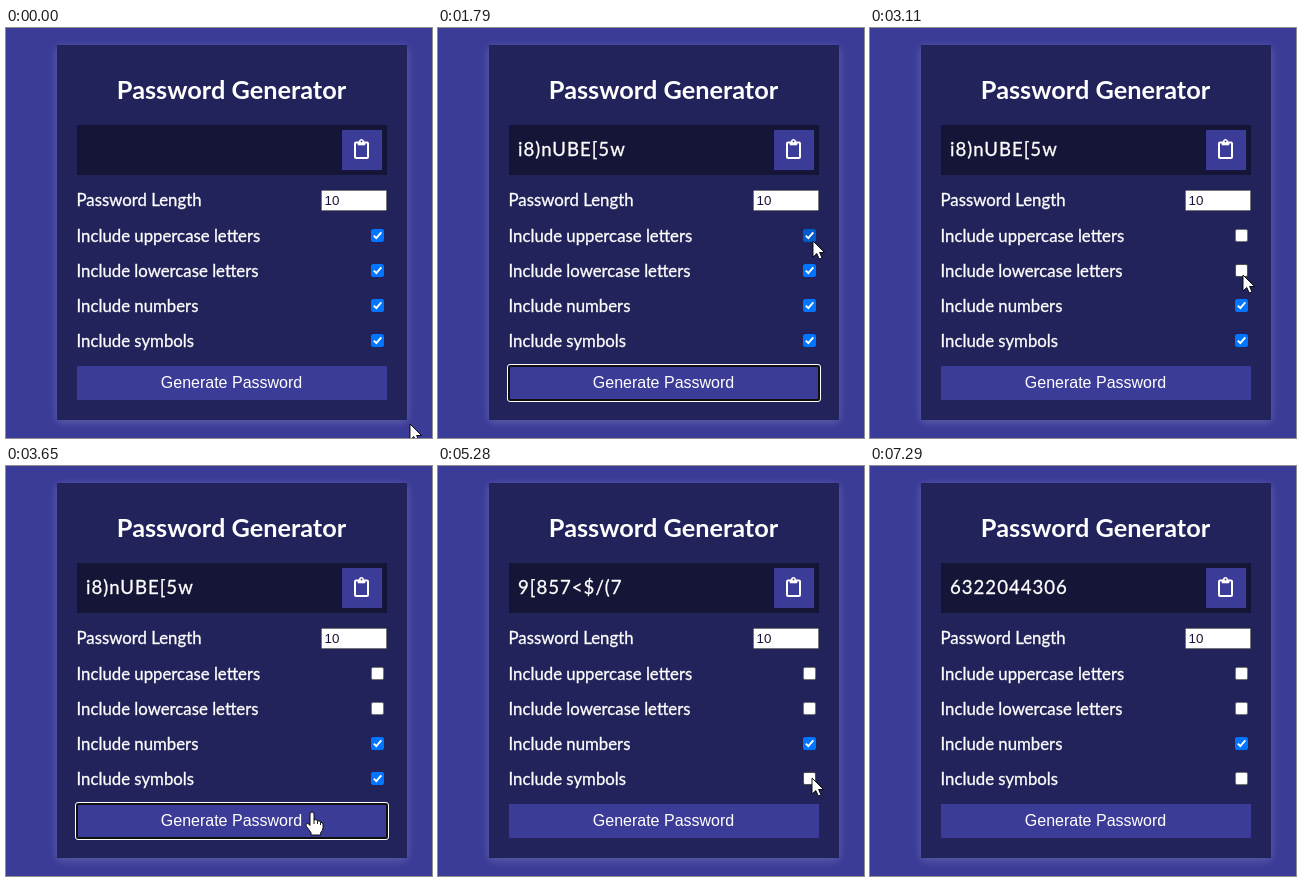
Recreate the animation shown at these times as an HTML page. Size 426 by 410 pixels, loop 7380 ms.

```html
<!DOCTYPE html>
<html lang="en">
<head>
<meta charset="utf-8">
<title>Password Generator</title>
<style>
  html, body { margin: 0; width: 100%; height: 100%; overflow: hidden; background: #3b3b98; }
  svg { display: block; width: 426px; height: 410px; }
  text { fill: #fff; font-family: Lato, sans-serif; }
  .card { fill: #23235b; filter: drop-shadow(0 2px 5px rgba(255, 255, 255, .2)); }
  .title { font-size: 25.3px; font-weight: 700; text-anchor: middle; }
  .label, .result { stroke: #fff; stroke-width: .3px; }
  .label { font-size: 16.8px; }
  .result { font-size: 18.6px; letter-spacing: 1px; white-space: pre; }
  .ui { font-family: "Liberation Sans", Arial, sans-serif; }
  .pointer path { fill: #fff; stroke: #000; stroke-width: .9px; stroke-linejoin: round; }
</style>
</head>
<body>
<svg viewBox="0 0 426 410">
  <rect width="426" height="410" fill="#3b3b98"/>
  <rect class="card" x="51" y="17" width="350" height="375"/>
  <text class="title" x="225.5" y="71">Password Generator</text>

  <rect x="71" y="97" width="310" height="50" fill="#151537"/>
  <text id="result" class="result" x="80" y="128"></text>
  <rect x="336" y="102" width="40" height="40" fill="#3b3b98"/>
  <g fill="none" stroke="#fff" stroke-width="2">
    <rect x="349" y="114.5" width="13" height="15.5" rx="1"/>
    <path d="M352 114h7v3h-7z" fill="#fff" stroke-width=".6"/>
    <circle cx="355.5" cy="113.4" r="1.7" stroke-width="1.6" fill="#3b3b98"/>
  </g>

  <text class="label" x="70.5" y="178">Password Length</text>
  <rect x="315.5" y="162.5" width="65" height="20" rx="1" fill="#fff" stroke="#767676"/>
  <text class="ui" x="318.5" y="177" font-size="13.33" style="fill:#1c1338">10</text>
  <g id="options"></g>

  <rect x="71" y="338" width="310" height="34" fill="#3b3b98"/>
  <g id="focus" fill="none">
    <rect x="71" y="338" width="310" height="34" rx="1.5" stroke="#101010" stroke-width="2"/>
    <rect x="69.5" y="336.5" width="313" height="37" rx="2.5" stroke="#fff"/>
  </g>
  <text class="ui" x="225.5" y="360" font-size="16" text-anchor="middle">Generate Password</text>

  <g id="pointer" class="pointer">
    <path id="arrow" d="M0 0V16L3.8 12.5L6.3 18L9 16.9L6.6 11.5H11.5Z"/>
    <g id="hand">
      <path d="M-2 2Q-2 0 0 0T2 2V8Q4.5 6.5 5.5 9Q8 8 8.5 10.3Q11 10 11 12.5V16Q10.5 19 8.7 20.5V23H-1V20.5L-5.5 14.5Q-6.8 12 -5 11.5Q-3.5 11.2 -2 13.5Z"/>
      <path d="M2 8V12M5.5 9V12M8.5 10.3V13" fill="none"/>
    </g>
  </g>
</svg>
<script>
const LOOP = 7380, TICK = 77;
const $ = id => document.getElementById(id);

const results = {
  0: "", 670: "]irVrTY4>4", 1230: "i8)nUBE[5w", 3730: "4)61&0=9{3",
  4250: "9[857<$/(7", 5980: "3170493580", 6450: "6322044306"
};
const focused = [[600, 2180], [3650, 5200], [5910, 7290]];
const clearedAt = { "uppercase letters": 2250, "lowercase letters": 2800, numbers: Infinity, symbols: 5200 };
const options = Object.entries(clearedAt).map(([name, off], i) => ({ name, off, y: 208 + 35 * i }));

// pointer trips: departure, arrival, x, y
const trips = [
  [70, 450, 294, 345],
  [840, 910, 296, 347],
  [1400, 1790, 375, 213],
  [1870, 2030, 373, 205],
  [2180, 2650, 374, 251],
  [2800, 3110, 373, 247],
  [3190, 3580, 306, 346],
  [4100, 4100, 310, 346],
  [4490, 4490, 327, 354],
  [4570, 5030, 374, 312],
  [5430, 5740, 315, 354],
  [6600, 7140, 432, 414]
];

// Each trip advances once per tick, eased, and sags a little below a straight line.
function pointerAt(t) {
  let x = 404, y = 396;
  for (const [from, to, endX, endY] of trips) {
    if (t < from) break;
    const count = Math.round((to - from) / TICK) + 1;
    const k = Math.min(1, (Math.floor((t - from + 8) / TICK) + 1) / count);
    const e = k * k * (3 - 2 * k);
    const dx = endX - x, dy = endY - y;
    x += dx * e;
    y += dy * e + Math.hypot(dx, dy) * .08 * Math.sin(Math.PI * e);
  }
  return [Math.round(x), Math.round(y)];
}

const inside = ([px, py], x, y, w, h) => px >= x && px < x + w && py >= y && py < y + h;
const show = (el, on) => el.setAttribute("visibility", on ? "visible" : "hidden");

$("options").innerHTML = options.map(({ name, y }) => `
  <text class="label" x="70.5" y="${y + 6}">Include ${name}</text>
  <rect x="365.5" y="${y - 6.5}" width="12" height="12" rx="1.5"/>
  <path d="M367.800 ${y - .3}l2.500 2.500l5 -5.800" fill="none" stroke="#fff" stroke-width="1.900"/>`).join("");
const boxes = $("options").querySelectorAll("rect");
const ticks = $("options").querySelectorAll("path");

function draw(t) {
  const pos = pointerAt(t);
  const onButton = inside(pos, 71, 338, 310, 34);
  $("pointer").setAttribute("transform", `translate(${pos})`);
  show($("hand"), onButton);
  show($("arrow"), !onButton);

  $("result").textContent = Object.entries(results).filter(([at]) => t >= at).pop()[1];
  show($("focus"), focused.some(([a, b]) => t >= a && t < b));

  options.forEach((o, i) => {
    const on = t < o.off;
    const hover = inside(pos, 364, o.y - 8, 15, 15);
    const blue = hover ? "#005cc8" : "#0075ff";
    boxes[i].setAttribute("fill", on ? blue : "#fff");
    boxes[i].setAttribute("stroke", on ? blue : hover ? "#4f4f4f" : "#767676");
    show(ticks[i], on);
  });
}

const origin = performance.now();
function frame() {
  draw((performance.now() - origin) % LOOP);
  requestAnimationFrame(frame);
}
draw(0);
requestAnimationFrame(frame);
</script>
</body>
</html>
```
